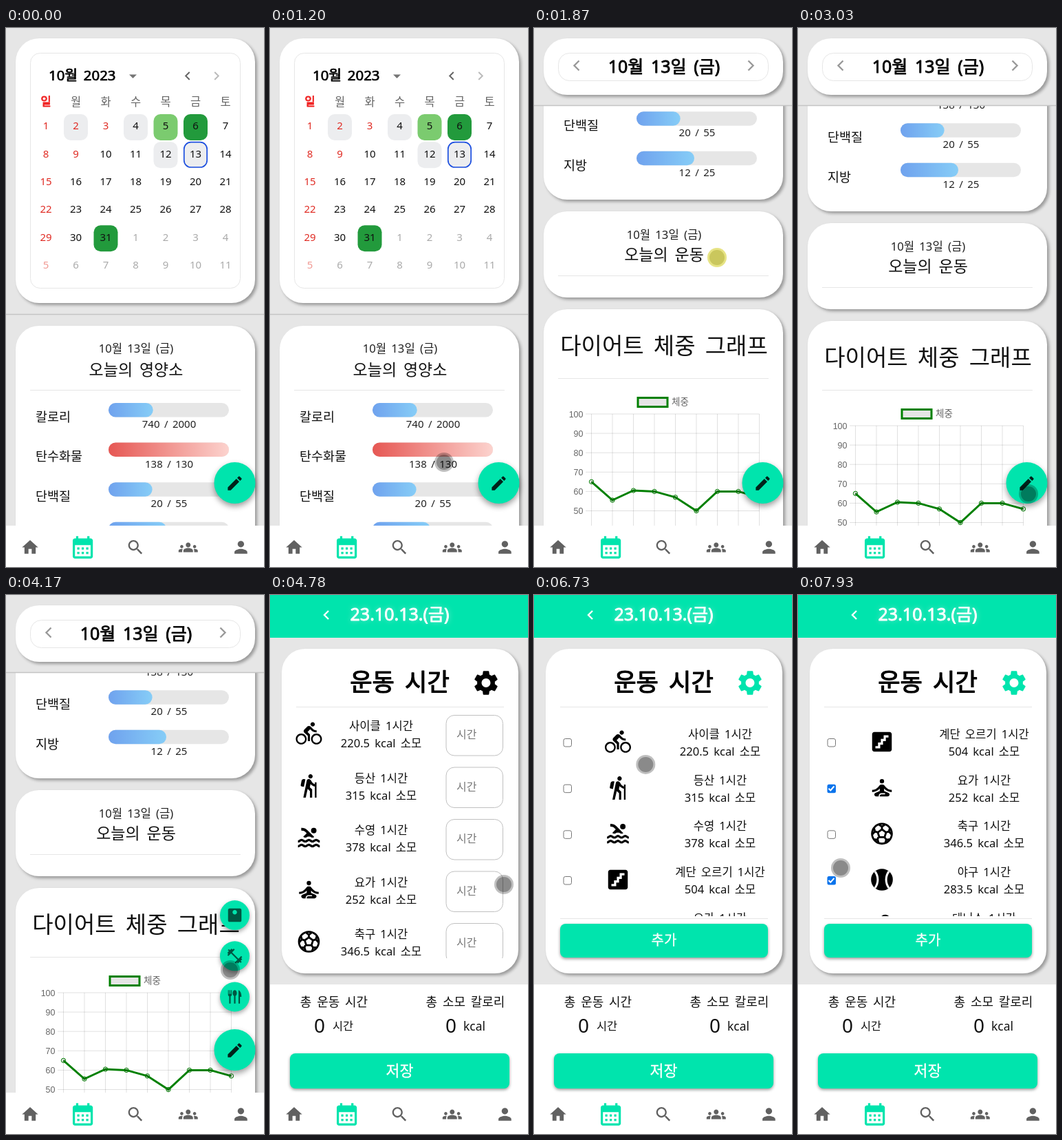
An HTML page with a canvas for the animation above (8000 ms loop, 375 by 782 pixels).

```html
<!DOCTYPE html>
<html lang="ko">
<head>
<meta charset="utf-8">
<title>건강 다이어리</title>
<style>
html, body { margin: 0; width: 100%; height: 100%; overflow: hidden; background: #e6e6e6; }
canvas { display: block; width: 375px; height: 782px; }
</style>
</head>
<body>
<canvas id="stage"></canvas>
<script>
const W = 375, H = 782, LOOP = 8000;
const canvas = document.getElementById('stage');
const c = canvas.getContext('2d');
const dpr = window.devicePixelRatio || 1;
canvas.width = W * dpr;
canvas.height = H * dpr;

const SANS = '"Noto Sans", "Noto Sans CJK KR", "Noto Sans CJK JP", "Noto Sans CJK", sans-serif';
const ARIAL = '"Liberation Sans", "Noto Sans CJK KR", "Noto Sans CJK JP", sans-serif';
const TEAL = '#00e4ad', LINE = '#e6e6e6', INK = '#111';

const icons = {
  home: 'M10 20v-6h4v6h5v-8h3L12 3 2 12h3v8z',
  month: 'M19 4h-1V2h-2v2H8V2H6v2H5c-1.11 0-1.99.9-1.99 2L3 20c0 1.1.89 2 2 2h14c1.1 0 2-.9 2-2V6c0-1.1-.9-2-2-2zm0 16H5V10h14v10zM9 14H7v-2h2v2zm4 0h-2v-2h2v2zm4 0h-2v-2h2v2zm-8 4H7v-2h2v2zm4 0h-2v-2h2v2zm4 0h-2v-2h2v2z',
  search: 'M15.5 14h-.79l-.28-.27C15.41 12.59 16 11.11 16 9.5 16 5.91 13.09 3 9.5 3S3 5.91 3 9.5 5.91 16 9.5 16c1.61 0 3.09-.59 4.23-1.57l.27.28v.79l5 4.99L20.49 19l-4.99-5zm-6 0C7.01 14 5 11.99 5 9.5S7.01 5 9.5 5 14 7.01 14 9.5 11.99 14 9.5 14z',
  groups: 'M12 12.75c1.63 0 3.07.39 4.24.9 1.08.48 1.76 1.56 1.76 2.73V18H6v-1.61c0-1.18.68-2.26 1.76-2.73 1.17-.52 2.61-.91 4.24-.91zM4 13c1.1 0 2-.9 2-2s-.9-2-2-2-2 .9-2 2 .9 2 2 2zm1.13 1.1c-.37-.06-.74-.1-1.13-.1-.99 0-1.93.21-2.78.58C.48 14.9 0 15.62 0 16.43V18h4.5v-1.61c0-.83.23-1.61.63-2.29zM20 13c1.1 0 2-.9 2-2s-.9-2-2-2-2 .9-2 2 .9 2 2 2zm4 3.43c0-.81-.48-1.53-1.22-1.85-.85-.37-1.79-.58-2.78-.58-.39 0-.76.04-1.13.1.4.68.63 1.46.63 2.29V18H24v-1.57zM12 6c1.66 0 3 1.34 3 3s-1.34 3-3 3-3-1.34-3-3 1.34-3 3-3z',
  person: 'M12 12c2.21 0 4-1.79 4-4s-1.79-4-4-4-4 1.79-4 4 1.79 4 4 4zm0 2c-2.67 0-8 1.34-8 4v2h16v-2c0-2.66-5.33-4-8-4z',
  edit: 'M3 17.25V21h3.75L17.81 9.94l-3.75-3.75L3 17.25zM20.71 7.04c.39-.39.39-1.02 0-1.41l-2.34-2.34a1 1 0 0 0-1.41 0l-1.83 1.83 3.75 3.75 1.83-1.83z',
  scale: 'M19 3H5c-1.1 0-2 .9-2 2v14c0 1.1.9 2 2 2h14c1.1 0 2-.9 2-2V5c0-1.1-.9-2-2-2zm-7 8c-1.66 0-3-1.34-3-3s1.34-3 3-3 3 1.34 3 3-1.34 3-3 3z',
  dumbbell: 'M20.57 14.86 22 13.43 20.57 12 17 15.57 8.43 7 12 3.43 10.57 2 9.14 3.43 7.71 2 5.57 4.14 4.14 2.71 2.71 4.14l1.43 1.43L2 7.71l1.43 1.43L2 10.57 3.43 12 7 8.43 15.57 17 12 20.57 13.43 22l1.43-1.43L16.29 22l2.14-2.14 1.43 1.43 1.43-1.43-1.43-1.43L22 16.29z',
  meal: 'M3 3h1v5h1V3h1v5h1V3h1v6c0 1.5-.8 2-1.5 2.3V21h-2v-9.7C3.8 11 3 10.5 3 9zM12 3c1.7 0 2.8 1.8 2.8 4 0 1.9-.7 3.3-1.8 3.8V21h-2V10.8C9.9 10.3 9.2 8.9 9.2 7c0-2.2 1.1-4 2.8-4zM17 3c2.5 1 4 4 4 9h-2v9h-2z',
  gear: 'M19.14 12.94c.04-.3.06-.61.06-.94 0-.32-.02-.64-.07-.94l2.03-1.58c.18-.14.23-.41.12-.61l-1.92-3.32c-.12-.22-.37-.29-.59-.22l-2.39.96c-.5-.38-1.03-.7-1.62-.94l-.36-2.54c-.04-.24-.24-.41-.48-.41h-3.84c-.24 0-.43.17-.47.41l-.36 2.54c-.59.24-1.13.57-1.62.94l-2.39-.96c-.22-.08-.47 0-.59.22L2.74 8.87c-.12.21-.08.47.12.61l2.03 1.58c-.05.3-.09.63-.09.94s.02.64.07.94l-2.03 1.58c-.18.14-.23.41-.12.61l1.92 3.32c.12.22.37.29.59.22l2.39-.96c.5.38 1.03.7 1.62.94l.36 2.54c.05.24.24.41.48.41h3.84c.24 0 .44-.17.47-.41l.36-2.54c.59-.24 1.13-.56 1.62-.94l2.39.96c.22.08.47 0 .59-.22l1.92-3.32c.12-.22.07-.47-.12-.61l-2.01-1.58zM12 15.6c-1.98 0-3.6-1.62-3.6-3.6s1.62-3.6 3.6-3.6 3.6 1.62 3.6 3.6-1.62 3.6-3.6 3.6z',
  bike: 'M15.5 5.5c1.1 0 2-.9 2-2s-.9-2-2-2-2 .9-2 2 .9 2 2 2zM5 12c-2.8 0-5 2.2-5 5s2.2 5 5 5 5-2.2 5-5-2.2-5-5-5zm0 8.5c-1.9 0-3.5-1.6-3.5-3.5s1.6-3.5 3.5-3.5 3.5 1.6 3.5 3.5-1.6 3.5-3.5 3.5zm5.8-10 2.4-2.4.8.8c1.3 1.3 3 2.1 5.1 2.1V9c-1.5 0-2.7-.6-3.6-1.5l-1.9-1.9c-.5-.4-1-.6-1.6-.6s-1.1.2-1.4.6L7.8 8.4c-.4.4-.6.9-.6 1.4 0 .6.2 1.1.6 1.4L11 14v5h2v-6.2l-2.2-2.3zM19 12c-2.8 0-5 2.2-5 5s2.2 5 5 5 5-2.2 5-5-2.2-5-5-5zm0 8.5c-1.9 0-3.5-1.6-3.5-3.5s1.6-3.5 3.5-3.5 3.5 1.6 3.5 3.5-1.6 3.5-3.5 3.5z',
  hike: 'M13.5 5.5c1.1 0 2-.9 2-2s-.9-2-2-2-2 .9-2 2 .9 2 2 2zM17.5 10.78c-1.23-.37-2.22-1.17-2.8-2.18l-1-1.6c-.41-.65-1.11-1-1.84-1-.78 0-1.59.5-1.78 1.44S7 23 7 23h2.1l1.8-8 2.1 2v6h2v-7.5l-2.1-2 .6-3c1 1.15 2.41 2.01 4 2.34V23H19V9h-1.5v1.78zM7.43 13.13l-2.12-.41c-.54-.11-.9-.63-.79-1.17l.76-3.93c.21-1.08 1.26-1.79 2.34-1.58l1.16.23-1.35 6.86z',
  swim: 'M19 5.5a2.5 2.5 0 1 1-5 0 2.5 2.5 0 0 1 5 0zM10 8l-3.25 3.25c.31.12.56.27.77.39.37.23.59.36 1.15.36s.78-.13 1.15-.36c.46-.27 1.08-.64 2.19-.64s1.73.37 2.18.64c.37.22.6.36 1.15.36.55 0 .78-.13 1.15-.36.12-.07.26-.15.41-.23L10.48 5C8.93 3.45 7.5 2.99 5 3v2.5c1.82-.01 2.89.39 4 1.5z',
  stairs: 'M19 3H5c-1.1 0-2 .9-2 2v14c0 1.1.9 2 2 2h14c1.1 0 2-.9 2-2V5c0-1.1-.9-2-2-2zm-1 5h-2.42v3.33H13v3.33h-2.58V18H6v-2h2.42v-3.33H11V9.33h2.58V6H18z',
  yoga: 'M14 6a2 2 0 1 1-4 0 2 2 0 0 1 4 0zM21 16v-2c-2.24 0-4.16-.96-5.6-2.68l-1.34-1.6C13.68 9.26 13.12 9 12.53 9h-1.05c-.6 0-1.15.26-1.53.72l-1.34 1.6C7.16 13.04 5.24 14 3 14v2c2.77 0 5.19-1.17 7-3.25V15l-3.88 1.55c-.67.27-1.12.93-1.12 1.66C5 19.2 5.8 20 6.79 20H9v-.5c0-1.38 1.12-2.5 2.5-2.5h3c.28 0 .5.22.5.5s-.22.5-.5.5h-3c-.83 0-1.5.67-1.5 1.5v.5h7.1c.99 0 1.9-.8 1.9-1.79 0-.73-.45-1.39-1.12-1.66L14 15v-2.25c1.81 2.08 4.23 3.25 7 3.25z',
  soccer: '',
  baseball: 'M22 12a10 10 0 1 1-20 0 10 10 0 0 1 20 0z',
  tennis: 'M20 7a5 5 0 1 1-10 0 5 5 0 0 1 10 0z'
};
// Stroked details on top of the filled paths: path, width, colour
const wave = y => `M2 ${y}c1.7 0 1.7-1.5 3.3-1.5s1.7 1.5 3.4 1.5 1.7-1.5 3.3-1.5 1.7 1.5 3.3 1.5 1.7-1.5 3.4-1.5 1.6 1.5 3.3 1.5`;
const strokes = {
  swim: [wave(15.6) + wave(20), 2],
  soccer: ['M21.1 12a9.1 9.1 0 1 1-18.2 0 9.1 9.1 0 0 1 18.2 0zM12 8l3.8 2.8-1.4 4.4H9.6l-1.4-4.4zM12 8V5.5L9 3.4m3 2.1 3-2.1m.8 7.4 2.6-.9.9-3.2m-.9 3.2 2.3 2.6m-6.3 2.7 1.6 2.3 3.2-.4m-3.2.4-1 3m-6.4-5.3L8 17.5l-3.2-.4m3.2.4 1 3m-.8-9.7-2.6-.9-.9-3.2m.9 3.2-2.3 2.6', 1.8],
  baseball: ['M5.6 4.4c3.4 4.6 3.4 10.6 0 15.2M18.4 4.4c-3.4 4.6-3.4 10.6 0 15.2', 1.9, '#fff'],
  tennis: ['M11 11 4 19', 2]
};

const sports = [
  ['사이클', '220.5', 'bike'], ['등산', '315', 'hike'], ['수영', '378', 'swim'],
  ['계단 오르기', '504', 'stairs'], ['요가', '252', 'yoga'], ['축구', '346.5', 'soccer'],
  ['야구', '283.5', 'baseball'], ['테니스', '346.5', 'tennis']
];
const nutrients = [['칼로리', 740, 2000], ['탄수화물', 138, 130], ['단백질', 20, 55], ['지방', 12, 25]];
const weights = [65, 55.5, 60.5, 60, 57, 50, 60, 60, 57];

// Pointer path: time, x, y
const track = [
  [530, 190, 699], [900, 260, 572], [1200, 253, 630], [1410, 253, 630], [1870, 266, 333],
  [2080, 266, 350], [2340, 266, 350], [2820, 355, 743], [3030, 335, 676], [3170, 335, 676],
  [3600, 279, 610], [3910, 290, 590], [3980, 290, 590], [4170, 326, 544], [4320, 330, 527],
  [4480, 330, 527], [4780, 340, 420], [5050, 340, 420], [5440, 314, 128], [6320, 315, 127],
  [7060, 53, 331], [7130, 53, 331], [7320, 45, 268], [7520, 50, 300], [7660, 47, 310], [7900, 62, 396]
];

const clamp = (v, a = 0, b = 1) => Math.min(b, Math.max(a, v));
const ease = p => p * p * (3 - 2 * p);
const ramp = (t, a, b) => ease(clamp((t - a) / (b - a)));

function pointerAt(t) {
  const i = track.findIndex(k => k[0] > t);
  if (i < 0) return track[track.length - 1].slice(1);
  const [t0, x0, y0] = track[Math.max(0, i - 1)], [t1, x1, y1] = track[i];
  const p = ramp(t, t0, t1);
  return [x0 + (x1 - x0) * p, y0 + (y1 - y0) * p];
}

// Weights above 400 are thickened with an outline
function text(s, x, y, size, color = INK, weight = 400, align = 'center', family = SANS) {
  c.font = `${size}px ${family}`;
  c.wordSpacing = `${size * 0.17}px`;
  c.textAlign = align;
  c.fillStyle = c.strokeStyle = color;
  c.fillText(s, x, y + size * 0.365);
  if (weight > 400) {
    c.lineWidth = size * (weight - 400) / 6000;
    c.lineJoin = 'round';
    c.strokeText(s, x, y + size * 0.365);
    c.lineJoin = 'miter';
  }
}

function box(x, y, w, h, r, fill, stroke, lw = 1) {
  c.beginPath();
  c.roundRect(x, y, w, h, r);
  if (fill) { c.fillStyle = fill; c.fill(); }
  if (stroke) { c.strokeStyle = stroke; c.lineWidth = lw; c.stroke(); }
}

function disc(x, y, r, fill) {
  c.beginPath();
  c.arc(x, y, r, 0, 7);
  c.fillStyle = fill;
  c.fill();
}

function line(points, color, lw = 1) {
  c.beginPath();
  points.forEach(p => c.lineTo(p[0], p[1]));
  c.strokeStyle = color;
  c.lineWidth = lw;
  c.stroke();
}

function shaded(dx, dy, blur, alpha, draw) {
  c.save();
  c.shadowColor = `rgba(0,0,0,${alpha})`;
  c.shadowOffsetX = dx * dpr;
  c.shadowOffsetY = dy * dpr;
  c.shadowBlur = blur * dpr;
  draw();
  c.restore();
}

function clipped(x, y, w, h, draw) {
  c.save();
  c.beginPath();
  c.rect(x, y, w, h);
  c.clip();
  draw();
  c.restore();
}

function icon(name, x, y, size, color = '#000') {
  c.save();
  c.translate(x - size / 2, y - size / 2);
  c.scale(size / 24, size / 24);
  c.fillStyle = color;
  c.fill(new Path2D(icons[name]));
  if (strokes[name]) {
    const [path, lw, tint] = strokes[name];
    c.strokeStyle = tint || color;
    c.lineWidth = lw;
    c.stroke(new Path2D(path));
  }
  c.restore();
}

const card = (x, y, w, h) => shaded(3, 3, 4, 0.33, () => box(x, y, w, h, 34, '#fff'));
const hr = (y, x0 = 35, x1 = 341) => line([[x0, y + 0.5], [x1, y + 0.5]], LINE);
const chevron = (x, y, dir, color, s = 5.5, lw = 2) =>
  line([[x - dir * s / 2, y - s], [x + dir * s / 2, y], [x - dir * s / 2, y + s]], color, lw);

function calendar() {
  card(14, 15, 348, 384);
  box(35.5, 36.5, 305, 341, 14, null, LINE);
  text('10월 2023', 62, 69, 20.4, '#000', 600, 'left');
  c.fillStyle = '#757575';
  c.fill(new Path2D('M179 67.5h11l-5.5 5.5z'));
  chevron(264, 69.5, -1, '#666');
  chevron(306, 69.5, 1, '#bbb');
  const col = i => 58 + 43.5 * i;
  [...'일월화수목금토'].forEach((d, i) =>
    text(d, col(i), 107, 16.5, i ? '#666' : '#f02222', i ? 400 : 700));
  const marks = { 2: '#ecedef', 4: '#ecedef', 5: '#7bcb6f', 6: '#229a3c', 12: '#ecedef', 13: '#ecedef', 31: '#229a3c' };
  for (let i = 0; i < 42; i++) {
    const n = i + 1, x = col(i % 7), y = 142 + 40.3 * Math.floor(i / 7);
    if (marks[n]) box(x - 17.5, y - 17, 35, 38, 10, marks[n]);
    if (n === 13) box(x - 16.7, y - 16.7, 33.4, 36.4, 10, null, '#1c4fe0', 1.7);
    const red = i % 7 === 0 || [2, 3, 9].includes(n);
    const color = i > 30 ? (red ? '#f09a94' : '#aaa') : red ? '#e02a22' : INK;
    text(i > 30 ? i - 30 : n, x, y, 15, color);
  }
}

function dayHeader() {
  card(14, 15, 348, 82);
  box(35.5, 36.5, 305, 40, 16, null, LINE);
  chevron(62, 54.5, -1, '#999', 7, 2.4);
  chevron(315, 54.5, 1, '#999', 7, 2.4);
  text('10월 13일 (금)', 189, 55.5, 25, '#000', 600);
}

function progress(y, [name, value, goal]) {
  const over = value > goal, w = 175 * Math.min(1, value / goal);
  text(name, 43, y + 20, 18.5, INK, 400, 'left');
  box(149, y, 175, 20.5, 10.2, LINE);
  const g = c.createLinearGradient(149, 0, 149 + w, 0);
  g.addColorStop(0, over ? '#e65753' : '#6fa2ee');
  g.addColorStop(1, over ? '#fcd3ce' : '#86cdf7');
  box(149, y, w, 20.5, 10.2, g);
  text(`${value} / ${goal}`, 237, y + 30.5, 15, '#222');
}

function chart() {
  box(151, 1074.5, 43, 13, 0, '#e5e5e5', 'green', 3);
  text('체중', 200, 1080, 13.5, '#666', 400, 'left', ARIAL);
  const px = i => 83.5 + 30.5 * i, py = v => 1098 + (100 - v) * 2.81;
  for (let v = 100; v >= 0; v -= 10) {
    line([[75, py(v)], [327.5, py(v)]], 'rgba(0,0,0,.12)');
    text(v, 71.5, py(v), 12.5, '#666', 400, 'right', ARIAL);
  }
  weights.forEach((_, i) => line([[px(i), py(100)], [px(i), py(0)]], 'rgba(0,0,0,.12)'));
  line(weights.map((v, i) => [px(i), py(v)]), 'green', 3);
  weights.forEach((v, i) => {
    c.beginPath();
    c.arc(px(i), py(v), 3.2, 0, 7);
    c.fillStyle = 'rgba(0,0,0,.1)';
    c.fill();
    c.strokeStyle = 'green';
    c.lineWidth = 1;
    c.stroke();
  });
}

function diary(t, pointerY) {
  const folded = t >= 1480;
  const dragY = t < 2080 ? pointerY : 350;
  const scroll = folded ? Math.max(0, 568 - dragY) : 0;
  const top = folded ? 113 : 416;
  clipped(0, top, W, 722 - top, () => {
    c.translate(0, top - 416 - scroll);
    card(14, 432, 348, 355);
    text('10월 13일 (금)', 189, 465, 16.7, '#222');
    text('오늘의 영양소', 189, 496, 23);
    hr(525);
    nutrients.forEach((n, i) => progress(544 + 57.6 * i, n));
    card(14, 804, 348, 125);
    text('10월 13일 (금)', 189, 838, 16.7, '#222');
    text('오늘의 운동', 189, 867, 23);
    hr(897);
    card(14, 946, 348, 520);
    text('다이어트 체중 그래프', 189, 999, 33);
    hr(1046);
    chart();
  });
  line([[0, top - 0.5], [W, top - 0.5]], '#c4c4c4', 1.3);
  folded ? dayHeader() : calendar();

  ['meal', 'dumbbell', 'scale'].forEach((name, i) => {
    const s = ramp(t, 3240 + 50 * i, 3440 + 50 * i);
    if (!s) return;
    c.save();
    c.translate(332.5, 583 - 59.2 * i);
    c.scale(s, s);
    c.globalAlpha = s;
    shaded(0, 3, 6, 0.35, () => disc(0, 0, 21.5, TEAL));
    icon(name, 0, 0, 26, 'rgba(0,0,0,.62)');
    c.restore();
  });
  shaded(0, 4, 8, 0.4, () => disc(332.5, 660, 30, TEAL));
  icon('edit', 332.5, 660.5, 27, 'rgba(0,0,0,.85)');
}

function button(label, x, y, w, h, size) {
  shaded(0, 2, 4, 0.4, () => box(x, y, w, h, 8, TEAL));
  text(label, x + w / 2, y + h / 2 - 0.5, size, '#fff', 500);
}

function sportText([name, kcal], x, y) {
  text(`${name} 1시간`, x, y, 16.6);
  text(`${kcal} kcal 소모`, x, y + 25, 16.6);
}

function timeList() {
  clipped(17, 164, 344, 363, () => {
    sports.filter(s => s[2] !== 'stairs').slice(0, 5).forEach((s, i) => {
      const y = 75.5 * i;
      icon(s[2], 56.5, 201 + y, 38);
      sportText(s, 161.5, 190 + y);
      box(256, 174.5 + y, 82.5, 58.5, 12, null, '#c0c0c0');
      text('시간', 271, 202.5 + y, 16, '#777', 400, 'left');
    });
  });
}

function checkbox(x, y, on) {
  if (!on) return box(x - 5.5, y - 5.5, 11.5, 11.5, 2.5, '#fff', '#767676');
  box(x - 6, y - 6, 12.5, 12.5, 2.5, '#0b74ec');
  line([[x - 4, y], [x - 1.2, y + 2.8], [x + 4, y - 3.2]], '#fff', 2);
}

function editList(t) {
  const scroll = 200 * ramp(t, 7660, 7870);
  const checked = { 요가: true, 야구: true, 수영: t >= 7130, 등산: t >= 7350 };
  clipped(17, 178, 344, 288, () => {
    sports.forEach((s, i) => {
      const y = 66.67 * i - scroll;
      checkbox(48.5, 214 + y, checked[s[0]]);
      icon(s[2], 122, 213 + y, 38);
      sportText(s, 270.5, 202 + y);
    });
  });
  hr(469, 38, 340);
  button('추가', 38, 477, 302, 49, 20);
}

function workout(t) {
  c.fillStyle = TEAL;
  c.fillRect(0, 0, W, 62);
  chevron(82, 29, -1, '#fff', 6, 2.4);
  c.save();
  c.shadowColor = 'rgba(255,255,255,.35)';
  c.shadowBlur = 8 * dpr;
  text('23.10.13.(금)', 188.5, 28, 25, '#fff', 600);
  c.restore();
  card(17, 78, 344, 471);
  text('운동 시간', 188.5, 126, 35.2, '#000', 600);
  hr(162, 38, 340);
  const p = ramp(t, 5600, 5990);
  icon('gear', 314, 127.5, 43, `rgb(0,${228 * p},${173 * p})`);
  t < 5600 ? timeList() : editList(t);

  c.fillStyle = '#fff';
  c.fillRect(0, 565, W, 217);
  text('총 운동 시간', 93, 590.5, 18);
  text('총 소모 칼로리', 284, 590.5, 18);
  text('0', 72, 625, 28);
  text('시간', 106, 625.5, 16.4);
  text('0', 263, 625, 28);
  text('kcal', 297, 625.5, 17.4);
  button('저장', 29, 665, 319, 51, 21.7);
}

function navBar() {
  c.fillStyle = '#fff';
  c.fillRect(0, 722, W, 60);
  ['home', 'month', 'search', 'groups', 'person'].forEach((name, i) => {
    const on = name === 'month';
    icon(name, 35 + 76.6 * i, 753.5, on ? 39 : 28, on ? TEAL : '#616161');
  });
}

function pointer(t, x, y) {
  const drag = t >= 1480 && t < 2080;
  disc(x, y, 14, drag ? 'rgba(214,208,50,.6)' : 'rgba(0,0,0,.25)');
  disc(x, y, 11, drag ? 'rgba(150,145,20,.35)' : 'rgba(0,0,0,.28)');
}

function draw() {
  const t = performance.now() % LOOP;
  const [x, y] = pointerAt(t);
  c.setTransform(dpr, 0, 0, dpr, 0, 0);
  c.fillStyle = '#e6e6e6';
  c.fillRect(0, 0, W, H);
  t < 4450 ? diary(t, y) : workout(t);
  navBar();
  if (t >= 530) pointer(t, x, y);
  requestAnimationFrame(draw);
}
draw();
</script>
</body>
</html>
```
